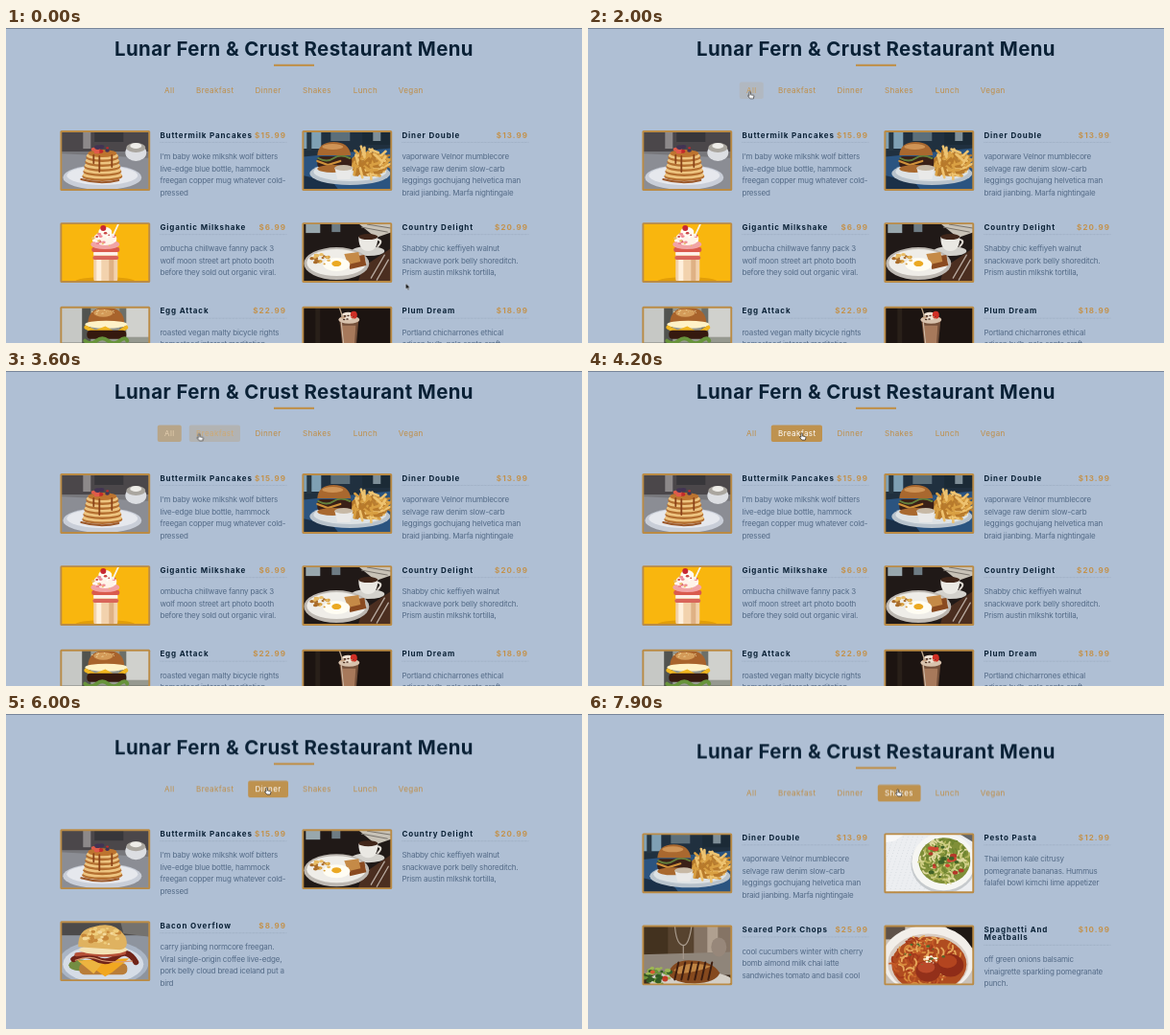
Write an HTML page that moves like this. It is 600 by 329 pixels and loops after 8 s.

```html
<!DOCTYPE html>
<html lang="en">
<head>
<meta charset="utf-8">
<title>Restaurant Menu</title>
<style>
html, body { margin: 0; width: 100%; height: 100%; overflow: hidden; background: #afbfd4; }
svg { display: block; }
#stage { position: absolute; left: 0; top: 0; width: 600px; height: 329px; }
text { font-family: Inter, "Noto Sans", sans-serif; font-optical-sizing: none; font-size: 8px; white-space: pre; }
.title { font-size: 20.4px; font-weight: 700; letter-spacing: .41px; text-anchor: middle; fill: #0a2136; }
.tab text { letter-spacing: .4px; fill: #bf8d45; }
.tab .on text { fill: #fff; }
.tab .on rect, .bar { fill: #be924f; }
.name { font-weight: 700; letter-spacing: .86px; fill: #0a2136; }
.price { font-weight: 700; letter-spacing: 1.1px; text-anchor: end; fill: #c3924c; }
.desc { letter-spacing: -.17px; fill: #536a86; }
.rule { stroke: #94a4b9; stroke-width: .6; stroke-dasharray: .8 .6; }
.frame { fill: #ba8b45; }

.top, .view, .arrow, .hand { animation: 8s step-end infinite; }
.top { animation-name: drop; }
.all { animation-name: all; }
.breakfast { animation-name: breakfast; }
.dinner { animation-name: dinner; }
.arrow { animation-name: arrow; }
.hand { animation-name: hand; }
.cursor { animation: move 8s linear infinite; }
.on { opacity: 0; animation: 8s linear infinite; }
.on-All { animation-name: overAll; }
.on-Breakfast { animation-name: overBreakfast; }
.on-Dinner { animation-name: overDinner; }
.on-Shakes { animation-name: overShakes; }

@keyframes drop {
  0% { transform: translateY(0); }
  60% { transform: translateY(13.2px); }
  83.75%, 100% { transform: translateY(17.4px); }
}
@keyframes all { 0% { opacity: 1; } 60%, 100% { opacity: 0; } }
@keyframes breakfast { 0% { opacity: 0; } 60% { opacity: 1; } 83.75%, 100% { opacity: 0; } }
@keyframes dinner { 0% { opacity: 0; } 83.75%, 100% { opacity: 1; } }
@keyframes arrow { 0% { opacity: 1; } 24.4% { opacity: 0; } 60% { opacity: 1; } 65.7%, 100% { opacity: 0; } }
@keyframes hand { 0% { opacity: 0; } 24.4% { opacity: 1; } 60% { opacity: 0; } 65.7%, 100% { opacity: 1; } }
@keyframes move {
  0% { transform: translate(416.6px, 266.8px); }
  12.5% { transform: translate(301.2px, 189.8px); }
  25%, 42% { transform: translate(168px, 66.6px); }
  47%, 62% { transform: translate(222px, 65px); }
  68%, 82% { transform: translate(271px, 77px); }
  87%, 93% { transform: translate(273px, 78.8px); }
  97%, 100% { transform: translate(322px, 78.8px); }
}
@keyframes overAll { 0%, 24.5% { opacity: 0; } 28.2%, 43.4% { opacity: 1; } 47.1%, 100% { opacity: 0; } }
@keyframes overBreakfast { 0%, 44.1% { opacity: 0; } 47.8%, 60% { opacity: 1; } 63.7%, 100% { opacity: 0; } }
@keyframes overDinner { 0%, 65.7% { opacity: 0; } 69.4%, 94% { opacity: 1; } 97.7%, 100% { opacity: 0; } }
@keyframes overShakes { 0%, 94.8% { opacity: 0; } 98.5%, 100% { opacity: 1; } }
</style>
</head>
<body>
<svg id="stage" viewBox="0 0 600 329"></svg>
<script>
// Drawing helpers for the dish pictures, in a 90 x 59 box
const oval = (x, y, rx, ry, c) => `<ellipse cx="${x}" cy="${y}" rx="${rx}" ry="${ry}" fill="${c}"/>`;
const box = (x, y, w, h, c, r = 0) => `<rect x="${x}" y="${y}" width="${w}" height="${h}" rx="${r}" fill="${c}"/>`;
const shape = (d, c) => `<path d="${d}" fill="${c}"/>`;
const line = (d, c, w) => `<path d="${d}" fill="none" stroke="${c}" stroke-width="${w}" stroke-linecap="round"/>`;
const back = c => box(-9, -9, 110, 80, c);

// Seeded small parts inside an ellipse
function scatter(n, cx, cy, rx, ry, draw, seed = 7) {
  const rand = () => (seed = seed * 16807 % 2147483647) / 2147483647;
  rand(); rand();
  let out = '';
  for (let i = 0; i < n; i++) {
    const a = rand() * 6.283, r = Math.sqrt(rand());
    out += draw(cx + rx * r * Math.cos(a), cy + ry * r * Math.sin(a), rand(), i);
  }
  return out;
}
const strands = (colors, len, w) => (x, y, k, i) => {
  const a = k * 6.283, dx = len * Math.cos(a), dy = len * Math.sin(a);
  return line(`M${x - dx} ${y - dy}q${dx + dy} ${dy - dx} ${2 * dx} ${2 * dy}`, colors[i % colors.length], w);
};
const sticks = (colors, len, w) => (x, y, k, i) => {
  const a = k * 3.14, dx = len * Math.cos(a), dy = len * Math.sin(a);
  return line(`M${x - dx} ${y - dy}L${x + dx} ${y + dy}`, colors[i % colors.length], w);
};
const bits = (colors, size) => (x, y, k, i) =>
  oval(x, y, size * (.5 + k), size * (.4 + k * .6), colors[i % colors.length]);

const pictures = {
  pancakes: () => back('#77777b') + box(-5, -5, 100, 25, '#4b474a') + box(22, -5, 8, 22, '#8d898a') +
    box(34, -5, 30, 15, '#37363a') + shape('M-5 22L95 27V65H-5z', '#8b8d94') +
    oval(42, 47, 41, 13, '#c9ced8') + oval(42, 45, 37, 10, '#e6e8ed') +
    oval(77, 21, 11, 9, '#dcdee2') + oval(77, 16, 10, 5, '#aaa69f') + oval(77, 14, 6, 3, '#eeece8') +
    [46, 41, 36, 31, 26].map((y, i) => oval(42, y, 21 - i, 5, '#b46f30') + oval(42, y - 1.6, 20.5 - i, 4, '#edc480')).join('') +
    oval(42, 22, 15, 4, '#bd742f') + line('M33 24v8M39 25v16M52 24v12', '#8a4319', 1.8) +
    line('M20 49q20 6 39 1', '#9c5829', 2) +
    scatter(9, 41, 18, 8, 4, bits(['#c22b2b', '#e05b4b', '#423354'], 2.4)),

  diner: () => back('#20303f') + box(-4, -5, 22, 22, '#7fa0b4') + box(3, -5, 5, 24, '#263744') +
    box(28, -5, 20, 14, '#5c6f7a') + box(61, -5, 38, 18, '#1b2a36') + box(72, -5, 8, 14, '#7f8f98') +
    shape('M-5 26L95 16V65H-5z', '#2b5480') + shape('M-5 44L30 52 40 65H-5z', '#1b3048') +
    oval(48, 43, 42, 12, '#b9c3cc') + oval(48, 41, 38, 10, '#dde2e5') +
    oval(68, 33, 20, 13, '#b97f33') +
    scatter(55, 68, 32, 19, 14, sticks(['#d9a043', '#b87a2b', '#eec370'], 5, 2.6)) +
    box(14, 25, 36, 12, '#3a2017', 4) + line('M15 27q9 5 16 0t17 0', '#64803c', 2) +
    line('M14 30L25 34 38 30', '#cf913a', 2.2) + oval(30, 38, 16, 4, '#a9692f') +
    shape('M14 24Q15 10 31 10T49 24z', '#a9682f') + oval(30, 15, 11, 3, '#cf9456') +
    shape('M32 37H51L48 49H35z', '#e9e9e8') + oval(41.5, 37, 9.5, 3, '#c7b9a6'),

  milkshake: () => back('#f9b60e') + oval(45, 60, 32, 5, '#e19d08') +
    box(33, 28, 25, 32, '#f2d2ad', 3) + box(36, 33, 5, 26, '#fff0dc') + box(49, 33, 5, 26, '#dfb184') +
    box(31, 24, 29, 5, '#da5a4d', 2) + box(33, 29, 25, 3, '#fff1ec') + box(32, 33, 27, 4, '#d9655a', 2) +
    oval(45, 21, 15, 5, '#f1a4a5') + oval(45, 15, 12, 7, '#fff3e9') + oval(45, 8, 7, 5, '#fffaf2') +
    scatter(22, 45, 15, 13, 8, bits(['#ef8791', '#ffffff', '#c94645', '#e7bd68'], 1.5)) +
    oval(43, 4, 3, 3, '#c72832') + line('M53 12L59-1', '#f7f2e9', 1.8),

  eggs: () => back('#201917') + box(2, -5, 15, 14, '#98a7ad') + box(29, -5, 9, 13, '#6e7c84') +
    shape('M53-4H95V7L75 14z', '#c8c2b7') + line('M60 3l27 5M66 0l25 4', '#78736c', 1) +
    shape('M61 45L95 22V65H55z', '#4b2e20') + oval(67, 28, 17, 5, '#d3d1cc') +
    shape('M57 13H77Q77 28 67 28T57 13z', '#eae8e3') + oval(67, 13, 10, 3, '#41261a') + line('M77 16q6 1 0 7', '#ded9d2', 2) +
    oval(34, 41, 34, 17, '#bdb8b2') + oval(34, 40, 31, 14, '#efede8') +
    shape('M45 34L63 32 65 43 48 47z', '#8a4a20') + shape('M42 31L57 29 59 39 46 42z', '#c58a47') +
    oval(34, 42, 14, 7, '#fffdf3') + oval(34, 41, 5, 3, '#eba922') +
    scatter(20, 18, 36, 10, 6, bits(['#d79e3d', '#a96c2a', '#e8bc66'], 2)) +
    line('M70 56L84 32M76 58L88 37', '#b8aaa0', 1.3),

  burger: () => back('#969990') + box(-5, -5, 26, 70, '#c6c8c5') + box(64, -5, 32, 35, '#d0d1cd') +
    box(21, -5, 9, 45, '#51534f') + box(60, -5, 7, 38, '#6c6f69') + shape('M-5 36H95V65H-5z', '#373832') +
    shape('M27 15Q28-1 46-1T65 15z', '#a8632c') + oval(43, 5, 10, 4, '#d49b59') +
    oval(46, 17, 22, 4, '#fff2c7') + line('M25 20L35 25 45 21 56 27 67 20', '#f0b621', 4) +
    box(26, 23, 41, 9, '#35190f', 4) + line('M24 34q6 5 12 0t12 0 12 0 8 0', '#67933b', 4) +
    box(27, 38, 39, 9, '#c98745', 4) + scatter(14, 44, 4, 13, 3, bits(['#efd59c'], .7)),

  shake: () => back('#1c1411') + box(-5, 40, 100, 25, '#30221b') + box(12, -5, 5, 45, '#292019') +
    shape('M37 12H57L53 56H42z', '#75513b') + shape('M40 18H54L52 47H43z', '#a7795b') +
    line('M39 15L43 53', '#d0b8a3', 1.3) + oval(47, 12, 11, 4, '#d8c2ad') +
    oval(46, 8, 7, 4, '#eee1d2') + oval(52, 7, 3.5, 4, '#cf2f25') + line('M41 11L37-1', '#bca68d', 1.3) +
    scatter(10, 46, 10, 7, 3, bits(['#4b2e20', '#caa07f'], 1)),

  bacon: () => back('#8e949e') + box(-5, -5, 100, 18, '#4c4a4a') + shape('M60-5H95V15L64 11z', '#74726f') +
    oval(43, 42, 47, 24, '#aab5c5') + oval(43, 43, 42, 20, '#d5dce6') +
    oval(18, 44, 11, 6, '#748d42') + box(18, 42, 50, 12, '#b97d39', 5) +
    shape('M21 39L70 37 53 51 45 56z', '#f1a720') + shape('M16 39L33 53 44 40z', '#edb440') +
    line('M12 38q12-8 23-1t22-2 20 6', '#712419', 6) + line('M15 33q13-2 22 0t28-2', '#b65138', 4) +
    line('M14 39q14-5 24-1t35 2', '#db9a72', 1.2) + oval(43, 28, 25, 5, '#f3e2b5') +
    shape('M17 25Q16 7 33 4 55-3 66 14 71 27 60 28z', '#dfb260') +
    scatter(34, 42, 14, 20, 9, bits(['#f4d99a', '#c7883a', '#efcc7b'], 2.4)),

  pesto: () => back('#eceef1') + Array.from({ length: 15 }, (_, i) =>
      `<path d="M${-5 + i * 5} -4l-22 66" stroke="#d3d8de" stroke-width=".8" stroke-dasharray="1 2"/>`).join('') +
    shape('M70-5H95V10z', '#626569') + shape('M-5-5H25L10 6-5 9z', '#f8f8f8') +
    oval(60, 30, 34, 31, '#c6cacd') + oval(60, 28, 33, 30, '#f6f6f3') + oval(61, 27, 27, 24, '#7f8f38') +
    scatter(120, 61, 27, 25, 22, strands(['#b0b55a', '#cfcf86', '#6f8632', '#e0d9a0'], 3, 1.8)) +
    scatter(12, 63, 24, 23, 19, bits(['#cf4632', '#b5372a'], 2.7), 23) +
    scatter(9, 58, 29, 22, 19, bits(['#3f6126'], 2.2), 91),

  pork: () => back('#57432f') + box(-5, -5, 30, 38, '#43321f') + box(52, -5, 45, 36, '#857465') +
    box(66, -5, 11, 32, '#b0a090') + shape('M-5 29L95 26V65H-5z', '#8f857a') +
    line('M32-4Q33 17 40 19T50-4M41 19v14', '#a89a8c', 1.2) + oval(78, 21, 8, 10, '#97877a') +
    shape('M-5 50H95V65H-5z', '#3a2a1e') + oval(48, 56, 44, 10, '#d3cec6') +
    shape('M25 49Q30 34 49 35 71 35 79 48 75 58 53 59 32 59 25 49z', '#85491e') +
    shape('M31 45Q45 34 70 41 60 46 36 49z', '#c08544') +
    [0, 1, 2, 3, 4, 5].map(i => line(`M${36 + i * 7} 37l-4 18`, '#3c1d10', 2)).join('') +
    scatter(38, 14, 51, 15, 9, bits(['#66923a', '#315b24', '#9cb653'], 2.4)) +
    oval(22, 54, 3, 3, '#c23d27') + oval(9, 47, 2.5, 2, '#d75b31'),

  spaghetti: () => back('#c9c1b9') + box(-5, -5, 25, 18, '#5e5148') + shape('M56-5H95V26z', '#1f1814') +
    oval(44, 34, 48, 36, '#f2eee9') + oval(44, 38, 42, 31, '#d8cbc1') + oval(45, 39, 39, 29, '#b04c20') +
    scatter(120, 42, 37, 35, 26, strands(['#d98a3c', '#c45a27', '#e6a85b', '#a63a1c'], 4, 1.8)) +
    oval(67, 40, 14, 12, '#8f2c18') + oval(64, 36, 10, 7, '#b3441f') +
    oval(44, 46, 13, 11, '#93301a') + oval(42, 42, 9, 6, '#b9492a') +
    scatter(16, 47, 34, 7, 4, bits(['#fff2da', '#f4dfbf'], 1.4)) +
    scatter(14, 36, 26, 26, 14, bits(['#4d6b2c', '#6c8238'], 1.3), 31)
};

// name, price, description; "|" breaks a line
const menu = {
  pancakes: ['Buttermilk Pancakes', 15.99, "I'm baby woke mlkshk wolf bitters|live-edge blue bottle, hammock|freegan copper mug whatever cold-|pressed"],
  diner: ['Diner Double', 13.99, 'vaporware Velnor mumblecore|selvage raw denim slow-carb|leggings gochujang helvetica man|braid jianbing. Marfa nightingale'],
  milkshake: ['Gigantic Milkshake', 6.99, 'ombucha chillwave fanny pack 3|wolf moon street art photo booth|before they sold out organic viral.'],
  eggs: ['Country Delight', 20.99, 'Shabby chic keffiyeh walnut|snackwave pork belly shoreditch.|Prism austin mlkshk tortilla,'],
  burger: ['Egg Attack', 22.99, 'roasted vegan malty bicycle rights|homestead interest meditation'],
  shake: ['Plum Dream', 18.99, 'Portland chicharrones ethical|edison bulb, palo santo craft'],
  bacon: ['Bacon Overflow', 8.99, 'carry jianbing normcore freegan.|Viral single-origin coffee live-edge,|pork belly cloud bread iceland put a|bird'],
  pesto: ['Pesto Pasta', 12.99, 'Thai lemon kale citrusy|pomegranate bananas. Hummus|falafel bowl kimchi lime appetizer'],
  pork: ['Seared Pork Chops', 25.99, 'cool cucumbers winter with cherry|bomb almond milk chai latte|sandwiches tomato and basil cool'],
  spaghetti: ['Spaghetti And|Meatballs', 10.99, 'off green onions balsamic|vinaigrette sparkling pomegranate|punch.']
};

const label = (cls, x, y, s) => `<text class="${cls}" x="${x}" y="${y}">${s}</text>`;
const lines = (cls, x, y, step, s) => s.split('|').map((part, i) => label(cls, x, y + i * step, part)).join('');

function card(id, x, y) {
  const [name, price, desc] = menu[id];
  const extra = name.includes('|') ? 8.5 : 0;
  return `<g transform="translate(${x} ${y})">
    <rect class="frame" width="93.8" height="62.8" rx="1.5"/>
    <svg x="1.9" y="1.9" width="90" height="59"><g filter="url(#soft)">${pictures[id]()}</g></svg>
    ${lines('name', 104, 7.4, 8.5, name)}${label('price', 235.7, 7.4, '$' + price)}
    <path class="rule" d="M104 ${12.4 + extra}H236"/>
    ${lines('desc', 104, 30.1 + extra, 12.5, desc)}</g>`;
}

const view = (cls, rows, ids) => `<g class="view ${cls}">` +
  ids.map((id, i) => card(id, i % 2 ? 308.4 : 56.4, rows[i >> 1])).join('') + '</g>';

// label, text start, button width
const tabs = [['All', 165, 25], ['Breakfast', 198, 53.2], ['Dinner', 259.4, 41.8],
  ['Shakes', 309, 44.8], ['Lunch', 361.8, 40], ['Vegan', 408.8, 40.6]];
const tab = ([s, x, w]) => `<g class="tab">${label('', x, 68.2, s)}
  <g class="on on-${s}"><rect x="${x - 7.2}" y="56.6" width="${w}" height="17.4" rx="2"/>${label('', x, 68.2, s)}</g></g>`;

document.getElementById('stage').innerHTML = `
  <defs><filter id="soft"><feGaussianBlur stdDeviation=".7"/></filter></defs>
  <rect width="600" height="329" fill="#afbfd4"/>
  <rect width="600" height="1" fill="#77859a"/>
  <g class="top">
    ${label('title', 300, 28.9, 'Lunar Fern &amp; Crust Restaurant Menu')}
    <rect class="bar" x="279" y="37.8" width="42" height="2.2"/>
    ${tabs.map(tab).join('')}
  </g>
  ${view('all', [107.1, 203.2, 290.8], ['pancakes', 'diner', 'milkshake', 'eggs', 'burger', 'shake'])}
  ${view('breakfast', [120.3, 216.3], ['pancakes', 'eggs', 'bacon'])}
  ${view('dinner', [124.4, 220.5], ['diner', 'pesto', 'pork', 'spaghetti'])}
  <g class="cursor">
    <path class="arrow" d="M0 0V6l1.4-1.3 1 2.2 1-.4-1-2.1h1.9z" fill="#000" stroke="#fff" stroke-width=".4"/>
    <path class="hand" d="M0 .6a.7.7 0 0 1 1.4 0V3l3 .6q.6.2.5 1L4.4 7H.8L-1.4 4.4q-.2-.8.6-.7L0 4.3z" fill="#fff" stroke="#111" stroke-width=".6"/>
  </g>`;
</script>
</body>
</html>
```
